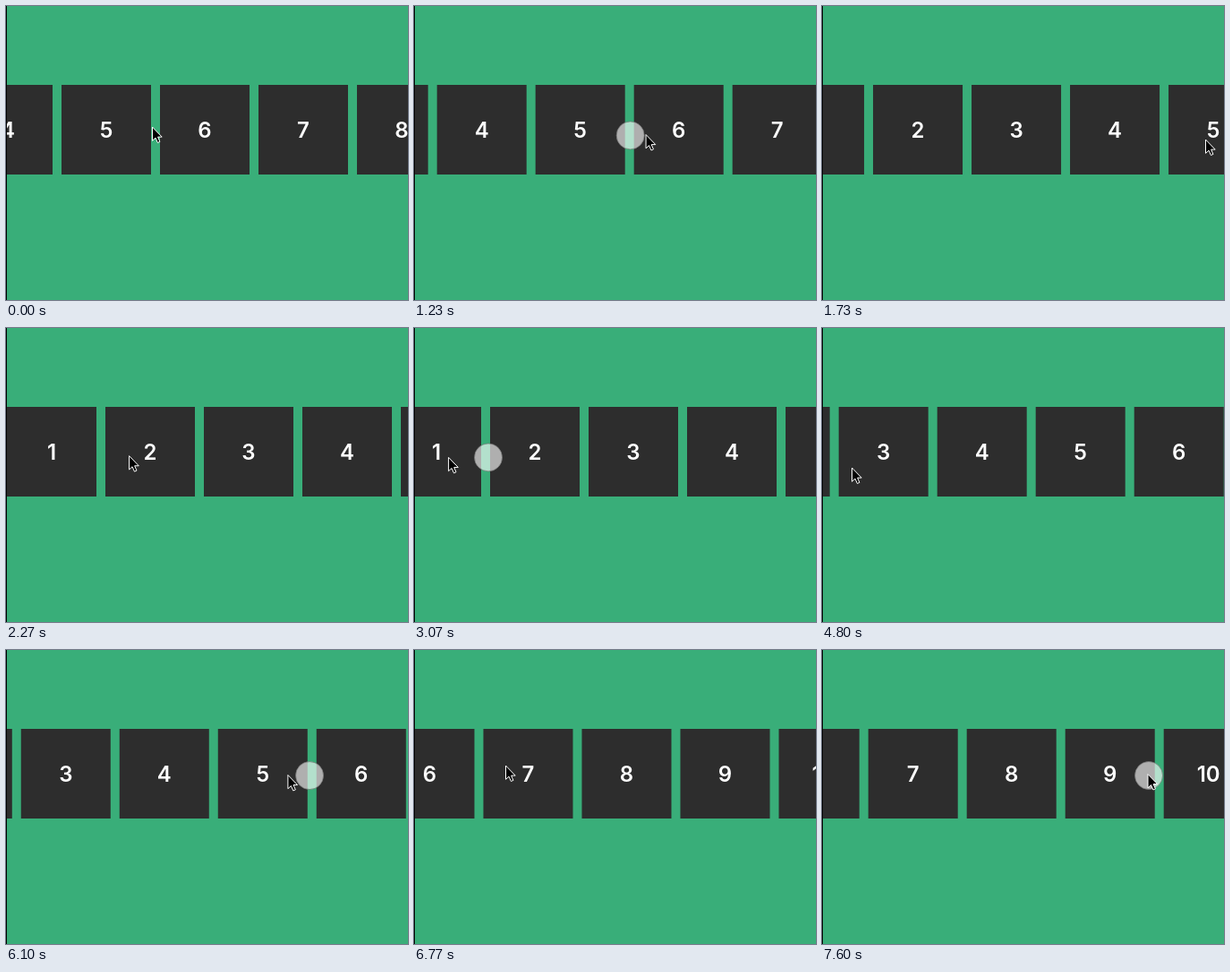
Write an HTML page that moves like this. It is 449x328 px and loops after 8000 ms.

```html
<!DOCTYPE html>
<html lang="en">
<head>
<meta charset="utf-8">
<title>Draggable cards</title>
<style>
  html, body { margin: 0; width: 100%; height: 100%; overflow: hidden; background: #39ae79; }
  svg { display: block; width: 449px; height: 328px; }
  .card text { font: 600 24px Inter, "Liberation Sans", sans-serif; fill: #fff; text-anchor: middle; }
</style>
</head>
<body>
<svg viewBox="0 0 449 328">
  <rect width="449" height="328" fill="#39ae79"/>
  <g id="track"></g>
  <rect width="1" height="328" fill="#000"/>
  <circle id="touch" r="15.5" fill="#fff" fill-opacity=".62" stroke="#777" stroke-opacity=".7"/>
  <path id="cursor" d="M.5 1V16.3L4 13.1L6.4 18.5L8.9 17.4L6.6 12.1H11.2Z"
        fill="#000" stroke="#fff" stroke-linejoin="round"/>
</svg>
<script>
const TICK = 100 / 3, TICKS = 240;
const TAU = 9.75, GLIDE = 38, FADE = 2;
const START = -378, MAX = 1;
const $ = id => document.getElementById(id);

const move = (from, to, x, y, drag) => ({ from, to, x, y, drag });

// Pointer rests at one spot and eases to the next; drags also pull the cards
const moves = [
  move(10, 13, 166.5, 139.5),
  move(30, 50, 428, 148, { press: 22, release: 39, goal: 23.6 }),
  move(56, 72, 107.5, 141),
  move(90.67, 96.67, -99.5, 148, { press: 80, release: 94, goal: -203 }),
  move(98, 112, 398, 118),
  move(116, 132, 347, 128),
  move(139, 145, 33, 155),
  move(154, 171, 339.5, 137.5),
  move(182.64, 190.64, 13, 150, { press: 173, release: 189, goal: -610.7 }),
  move(191, 200, 102, 128),
  move(206, 222, 363.5, 137.5),
  move(TICKS, TICKS + 20, 363.5, 137.5, { press: 226, release: TICKS + 10, goal: 0 })
];
const drags = moves.filter(m => m.drag);

const clamp = v => Math.max(0, Math.min(1, v));
const ease = u => u * u * (3 - 2 * u);

function pointer(t) {
  let x = 163, y = 134;
  for (const m of moves) {
    const k = ease(clamp((t - m.from) / (m.to - m.from)));
    x += (m.x - x) * k;
    y += (m.y - y) * k;
  }
  return [x, y];
}

// Cards follow the pointer while held, then glide on with friction
function offset(t) {
  let x = START;
  for (const { from, drag: { release, goal } } of drags) {
    if (t < from) break;
    x += pointer(Math.min(t, release))[0] - pointer(from)[0];
    const glide = Math.max(0, Math.min(t - release, GLIDE));
    if (glide) x = Math.min(MAX, goal + (x - goal) * Math.exp(-glide / TAU));
  }
  return x;
}

const touchAlpha = t => Math.max(...drags.map(({ drag: { press, release } }) =>
  Math.min(clamp((t - press) / FADE), clamp(1 - (t - release) / FADE))));

const place = (el, x, y) =>
  el.setAttribute("transform", `translate(${x.toFixed(2)} ${y.toFixed(2)})`);

function draw(t) {
  const [x, y] = pointer(t);
  place($("track"), offset(t), 88);
  place($("touch"), x + 1.5, y + 2.5);
  $("touch").setAttribute("opacity", touchAlpha(t));
  place($("cursor"), ...pointer(t + 1)); // the arrow runs one tick ahead of the touch
}

for (let n = 1; n <= 10; n++) {
  const left = (n - 1) * 110;
  $("track").insertAdjacentHTML("beforeend",
    `<g class="card"><rect x="${left}" width="100" height="100" fill="#2d2d2d"/>` +
    `<text x="${left + 50}" y="58.5">${n}</text></g>`);
}

const begin = performance.now();
function loop() {
  const ms = performance.now() - begin;
  draw(Math.floor((ms + 3.4) / TICK) % TICKS);
  requestAnimationFrame(loop);
}
loop();
</script>
</body>
</html>
```
